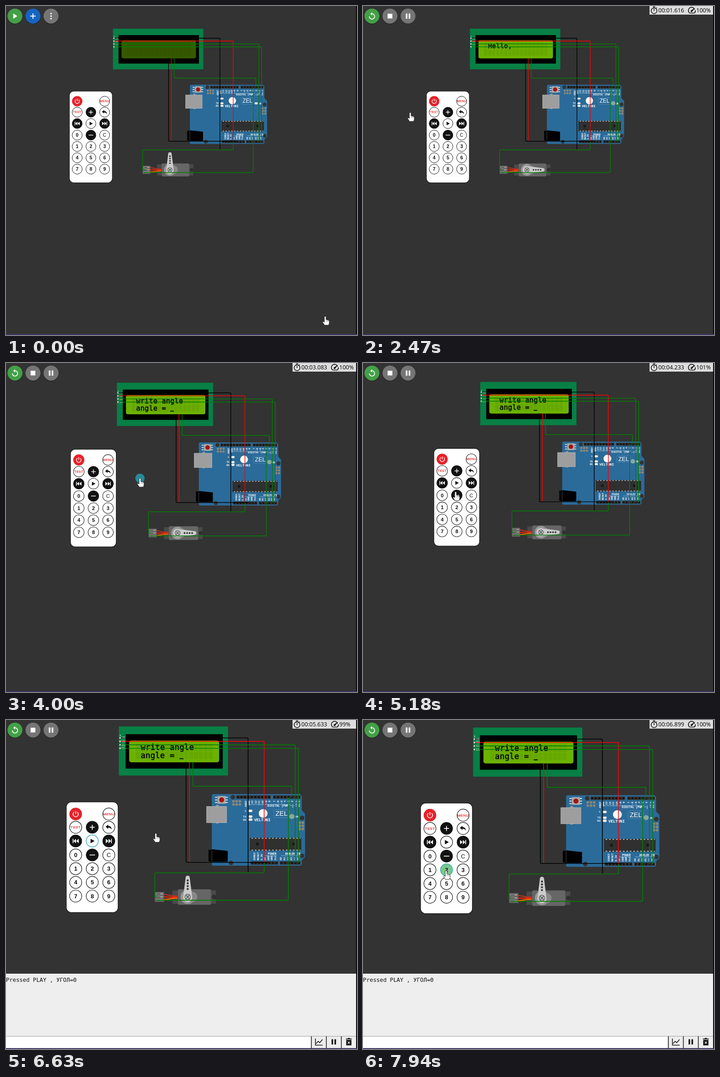
An HTML page for the animation above (8000 ms loop, 773 px wide and 725 px high).

```html
<!DOCTYPE html>
<html lang="en">
<head>
<meta charset="utf-8">
<title>Remote controlled servo simulation</title>
<style>
  html, body { margin: 0; width: 100%; height: 100%; overflow: hidden; background: #333; }
  svg { display: block; width: 100vw; height: 100vh; }
  text { white-space: pre; }
  .sans { font-family: "Liberation Sans", Arial, sans-serif; }
  .ui { font-family: "Open Sans", "Noto Sans", sans-serif; }
  .mono { font-family: "DejaVu Sans Mono", monospace; }
  .silk { font-family: "Liberation Mono", monospace; font-weight: bold; fill: #fff; }
</style>
</head>
<body>
<svg id="stage" viewBox="0 0 773 725" preserveAspectRatio="none"></svg>
<script>
const rect = (x, y, w, h, fill, extra = '') =>
  `<rect x="${x}" y="${y}" width="${w}" height="${h}" fill="${fill}" ${extra}/>`;
const circle = (x, y, r, fill, extra = '') => `<circle cx="${x}" cy="${y}" r="${r}" fill="${fill}" ${extra}/>`;
const path = (d, fill, extra = '') => `<path d="${d}" fill="${fill}" ${extra}/>`;
const line = (d, color, width = 1, extra = '') =>
  path(d, 'none', `stroke="${color}" stroke-width="${width}" ${extra}`);
const text = (x, y, size, cls, str, extra = '') =>
  `<text x="${x}" y="${y}" font-size="${size}" class="${cls}" ${extra}>${str}</text>`;
const group = (id, content, extra = '') => `<g id="${id}" ${extra}>${content}</g>`;
const repeat = (n, draw) => Array.from({ length: n }, (_, i) => draw(i)).join('');
const MID = 'text-anchor="middle"';

const MM = 2.4875, LCD_X = 235.5, LCD_Y = 50, CELL = 3.55 * MM, ROW = 5.95 * MM;
const TEXT_X = LCD_X + 12.45 * MM, TEXT_Y = LCD_Y + 12.5 * MM;

function lcd() {
  const row = (y, str) => text(TEXT_X + CELL, y + 11.6, 14.67, 'mono', str, 'stroke="#000" stroke-width=".35"');
  const lines = (id, top, bottom) => group(id, row(TEXT_Y, top) + row(TEXT_Y + ROW, bottom) +
    (bottom ? rect(TEXT_X + 9 * CELL, TEXT_Y + ROW + 12.2, 7.4, 1.6, '#000') : ''));
  const pins = ['GND', 'VCC', 'SDA', 'SCL'];
  return rect(LCD_X, LCD_Y, 80 * MM, 36 * MM, '#087f45') +
    rect(LCD_X + 4.95 * MM, LCD_Y + 5.7 * MM, 71.2 * MM, 25.2 * MM, '#000') +
    rect(LCD_X + 7.55 * MM, LCD_Y + 10.3 * MM, 66 * MM, 16 * MM, '#365900', 'id="screen" rx="3.8"') +
    repeat(32, i => rect(TEXT_X + i % 16 * CELL, TEXT_Y + (i >> 4) * ROW, 7.34, 13.8, '#000', 'opacity=".06"')) +
    lines('hello', 'Hello,', '') + lines('prompt', 'write angle', 'angle =') +
    text(237, 68, 4, 'silk', '1') +
    pins.map((p, i) => circle(237.8, 71 + i * 6.3, 1.5, '#ddd') +
      text(240.5, 72.5 + i * 6.3, 4, 'silk', p)).join('');
}

function board() {
  const up = (x, y, label, anchor) => text(0, 0, 5, 'silk', label,
    `text-anchor="${anchor}" transform="translate(${x + 1.6} ${y}) rotate(-90)"`);
  const header = (x, y, n) => rect(x, y, n * 6.3, 6.2, '#333') +
    repeat(n, i => rect(x + 1.7 + i * 6.3, y + 1.6, 3, 3, '#0c0c0c'));
  const dots = (x, y, cols, rows) => repeat(cols * rows,
    i => circle(x + i % cols * 5.8, y + Math.floor(i / cols) * 5.8, 2.4, '#8c8677'));
  const digital = 'AREF GND 13 12 ~11 ~10 ~9 8'.split(' ');
  const digital2 = '7 ~6 ~5 4 ~3 2 TX→1 RX←0'.split(' ');
  const power = 'IOREF RESET 3.3V 5V GND GND Vin'.split(' ');
  const led = (x, y) => rect(x, y, 7, 4, '#ddd', 'rx="1"') + rect(x + 1.8, y, 3.4, 4, '#fff');
  return path('M405 177q0-3.5 3.5-3.5H566l3 3.5v26l6 6v79l-6 6v8l-3 2H408q-3 0-3-3Z', '#2b6b99') +
    [[443.5, 179], [569.5, 217], [569.5, 286], [440, 299]].map(p => circle(...p, 4.2, '#333')).join('') +
    path('M411 197q4-9 8 0v28q-4 5-8 0z', '#8d9499') +
    rect(395.5, 196, 36.5, 29.5, '#9e9e9e', 'stroke="#b8b8b8" stroke-width=".8"') +
    path('M399 275h6v-1l29 3v20h-29l-6-1z', '#000') + rect(404, 276, 2, 20, '#222') +
    repeat(6, i => rect(i % 2 ? 430 : 411, 178.5 + (i >> 1) * 4.7, 4, 1.8, '#ddd')) +
    rect(415.5, 177, 15, 14, '#aaa', 'rx="1"') + circle(423, 184, 4.6, '#a5140f') +
    dots(444.5, 186.5, 3, 2) + dots(565.2, 225.5, 2, 3) +
    header(449.5, 175.8, 10) + header(516.5, 175.8, 8) +
    header(475.5, 296, 8) + header(529, 296, 6) +
    digital.map((p, i) => up(466.5 + i * 6.3 - (i > 1 ? .5 : 0), 185, p, 'end')).join('') +
    digital2.map((p, i) => up(519 + i * 6.45, 185, p, 'end')).join('') +
    power.map((p, i) => up(483 + i * 6.3, 294.5, p, 'start')).join('') +
    repeat(6, i => up(531 + i * 6.3, 294.5, 'A' + i, 'start')) +
    text(530.5, 196.5, 5.3, 'silk', 'DIGITAL (PWM ~)', MID) + line('M472 192.5h76', '#dfe9ef', .5) +
    text(515, 284.5, 5.2, 'silk', 'POWER', MID) + text(552.5, 284.5, 5.2, 'silk', 'ANALOG IN', MID) +
    line('M501 286h22M531 286h36', '#dfe9ef', .5) +
    circle(498.5, 208.7, 8, '#fff') + text(497, 223, 7.1, 'silk', 'VELTONI', MID) +
    rect(518, 202, 28, 14.5, 'none', 'rx="2" stroke="#5f93b8" stroke-width=".6"') +
    text(532, 213.3, 12, 'sans', 'ZEL', MID + ' fill="#fff"') +
    text(465, 205.3, 5, 'silk', 'L') + text(462, 216, 5, 'silk', 'TX') + text(462, 222, 5, 'silk', 'RX') +
    led(472, 202) + led(472, 212.5) + led(472, 218) + led(547.5, 212.5) + text(557, 216.5, 5, 'silk', 'ON') +
    circle(551, 214.3, 4.6, '#86a99f', 'id="power-led"') +
    rect(475, 253.5, 92.5, 22.5, '#303030', 'stroke="#222"') +
    line('M477 254h90M477 275.5h90', '#bbb', 1.4, 'stroke-dasharray="3.2 3.1"') +
    circle(488, 264.5, 2.8, '#191919') + circle(554, 264.5, 2.8, '#191919');
}

function servo() {
  const leads = ['#b32', '#f20', '#f60'].map((c, i) =>
    line(`M317 ${356 + i * 5}C326 ${357 + i * 4.4} 328 ${359.5 + i * 2} 342 ${359.2 + i * 2}`, c, 1.9)).join('');
  return rect(301, 352, 17, 18, '#666') +
    repeat(3, i => rect(303, 354 + i * 5.5, 13, 2.6, '#999') + rect(304, 355 + i * 5.5, 7, 1, '#333')) +
    rect(333, 349, 79.5, 24.5, '#4a4a4a') + circle(409, 361, 4.2, '#303030') + leads +
    rect(343, 347, 60.5, 28.5, '#666', 'rx="3"') +
    circle(361, 361, 13, '#999') + circle(369, 361, 9.5, '#888') +
    group('horn', path('M-8.3 1a8.3 8.3 0 0 0 16.6 0L3.8-35a3.8 3.8 0 0 0-7.6 0Z', '#ccc') +
      repeat(4, i => circle(0, -14.5 - i * 5.2, 1.8, '#303030'))) +
    circle(361, 361, 5.2, '#bbb', 'stroke="#555" stroke-width="1"') +
    line('M357.5 357.5l7 7m0-7l-7 7', '#555', 1.2);
}

const COLS = [156.8, 187, 217.2], ROWS = [209.8, 234, 259, 284.5, 309.5, 334.5, 359.5];
function remote() {
  const key = (c, r, face, fill = '#fff', id = '') =>
    `<g transform="translate(${COLS[c]} ${ROWS[r]})">` +
    circle(0, 0, 11, fill, `stroke="${fill === '#fff' ? '#111' : fill}" stroke-width="1" ${id && `id="${id}"`}`) + face + '</g>';
  const digit = s => text(0, 3.8, 10.6, 'sans', s, MID + ' font-weight="bold" fill="#111"');
  const word = s => text(0, 2.4, 6.6, 'sans', s, MID + ' fill="#d22" stroke="#d22" stroke-width=".2" letter-spacing=".4"');
  const skip = 'M-5.5-4h1.4v8h-1.4zM.5-4v8l-4.5-4zM5.5-4v8L1-0z';
  const black = '#121212';
  return rect(139.6, 187.6, 94.6, 202, '#fff', 'rx="9.5" stroke="#1f1f1f" stroke-width="1.3"') +
    key(0, 0, line('M-3-3.6a4.8 4.8 0 1 0 6 0M0-5.5V0', '#fff', 1.3), '#e62129') +
    key(2, 0, word('MENU')) + key(0, 1, word('TEST')) +
    key(1, 1, line('M-4.5 0h9M0-4.5v9', '#fff', 1.4), black) +
    key(2, 1, path('M-6-1l5-4v2.6q6 0 6.2 6.6q-2-3.8-6.2-3.8v2.6z', '#111')) +
    key(0, 2, path(skip, '#fff'), black) +
    key(1, 2, path('M-3-4l7.2 4l-7.2 4z', '#111'), '#fff', 'key-play') +
    key(2, 2, path(skip, '#fff', 'transform="scale(-1 1)"'), black) +
    key(0, 3, digit('0')) + key(1, 3, line('M-5 0h10', '#fff', 1.4), black) +
    key(2, 3, text(0, 3.8, 10.6, 'sans', 'C', MID + ' fill="#111"')) +
    repeat(9, i => key(i % 3, 4 + Math.floor(i / 3), digit(i + 1), '#fff', 'key-' + (i + 1)));
}

const wires = () => [
  ['M239 71H469.2q2 0 2 2V316', '#000'],
  ['M239 77.2H498.4q2 0 2 2V299', '#f00'],
  ['M239 83.5H555q2 0 2 2V299', 'green'],
  ['M239 90H561q2 0 2 2V299', 'green'],
  ['M364 115V297', '#f00'],
  ['M358 115V296q0 2 2 2H508', '#000'],
  ['M370.5 115V157q0 2 2 2H548.5q2 0 2 2V179', 'green'],
  ['M306 361H301V319q0-2 2-2H498.4q2 0 2-2V299', 'green'],
  ['M303 367H542.5q2 0 2-2V179', 'green'],
].map(([d, color]) => line(d, color, 1.35)).join('');

function toolbar() {
  const disc = (x, color) => circle(x, 23.5, 16.8, '#000', 'opacity=".22"') + circle(x, 22.2, 16.5, color);
  return group('idle-bar', disc(19.7, '#43a047') + path('M16 16.5v11.6l9-5.8z', '#fff') +
      disc(59.4, '#1565c0') + line('M53.4 22.2h12M59.4 16.2v12', '#fff', 2) +
      disc(99.2, '#757575') + repeat(3, i => circle(99.2, 16.8 + i * 5.5, 1.7, '#fff'))) +
    group('run-bar', disc(19.7, '#43a047') + line('M14 23a5.8 5.8 0 1 0 5.8-5.8', '#fff', 1.8) +
      path('M20 13.4v7.6l-4-3.8z', '#fff') +
      disc(59.4, '#757575') + rect(54.2, 17, 10.4, 10.4, '#fff') +
      disc(99.2, '#757575') + rect(94.3, 16.5, 3.5, 11.5, '#fff') + rect(100.6, 16.5, 3.5, 11.5, '#fff'));
}

const meter = () => group('meter', rect(631, 0, 140, 19, '#ddd') +
  circle(641, 10.5, 6.4, 'none', 'stroke="#111" stroke-width="1.6"') +
  line('M638.5 1.8h5M641 6.5v4.5M645.5 5l1.5-1.5', '#111', 1.6) +
  text(650.5, 14, 12.5, 'ui', '', 'id="clock"') +
  line('M719.3 15.5a7 7 0 1 1 11-7.5M732 9.5a7 7 0 0 1-2.2 6H719.5', '#111', 1.6) +
  path('M731 4l-6 8.5a1.8 1.8 0 0 1-3-2.6z', '#111') +
  text(734, 14, 12.5, 'ui', '', 'id="speed"'));

const serial = () => group('serial', rect(0, 559, 771, 164, '#eee') +
  text(0, 577.3, 12.3, 'mono', 'Pressed PLAY , УГОЛ=0', 'fill="#111"') +
  rect(0, 697, 671, 26, '#fff') + line('M0 697h771', '#999', 1) +
  line('M672.5 697V723M705.5 697V723M738.5 697V723', '#111', 1.5) +
  line('M681.5 702v14.5h16M683 713l4.5-5 3.5 3 6-7', '#111', 1.6) +
  rect(717, 703.5, 3.4, 11.5, '#111') + rect(723.4, 703.5, 3.4, 11.5, '#111') +
  path('M748.5 702h3.5l1-1.2h4l1 1.2h3.5v1.8h-13zM749.3 705h11.4v12h-11.4z', '#111') +
  line('M752.8 708.8l4.4 4.4m0-4.4l-4.4 4.4', '#eee', 1.3));

const hand = 'M-1.9 1.6a1.9 1.9 0 0 1 3.8 0V7l5 1.3q2.1.6 2.1 2.6v2.6q0 2-1.5 5.7H-1.8q-.9-2.4-3.2-5.2-1.3-1.9.2-2.6t2.9 1.5Z';

document.getElementById('stage').innerHTML = rect(0, 0, 773, 725, '#333') +
  group('scene', lcd() + board() + servo() + remote() + wires()) +
  toolbar() + meter() + serial() +
  rect(771, 0, 2, 725, '#080808') + rect(0, 723.3, 773, 1.7, '#3d3672') +
  circle(0, 0, 10.3, '#258a9b', 'id="grab"') +
  group('pointer', path(hand, '#fff', 'stroke="#222" stroke-width=".9"') +
    line('M2.2 8v4M4.6 8.6v3.6M6.8 9.4v3', '#555', .6));

const LOOP = 8000, RUN = 880, LIGHT = 1900, PROMPT = 3000, PRESS_PLAY = 5480, PRESS_TWO = 7800;
const DRAGS = [[3420, 4450], [6750, 7050]];
const ACTIONS = [
  { zoom: 3100 }, { drag: DRAGS[0] }, { zoom: 6150 }, { zoom: 6300 }, { drag: DRAGS[1] },
];
const POINTER = [
  [70, 703, 684], [780, 19, 19], [950, 20, 20], [1350, 79, 214], [1700, 94, 228], [2020, 101, 245],
  [2470, 104, 235], [2600, 104, 235], [3050, 282, 248], [3420, 283.3, 247.7], [4000, 295, 254],
  [4450, 309, 252.3], [4550, 309, 252.3], [5180, 204, 284], [5380, 206, 262], [5540, 206, 262],
  [5980, 330, 247], [6350, 330, 247], [6630, 330, 250], [6750, 330, 250], [7050, 324, 252.5],
  [7180, 324, 252.5], [7720, 183, 332],
];
const CLOCK = [[RUN, 4], [1350, 32], [2470, 97], [4000, 185], [5180, 254], [6630, 338], [7940, 414], [8000, 417]];
const SPEED = [[0, 0], [1880, 98], [2130, 100], [4600, 101], [5400, 99], [7000, 100], [7560, 101], [7800, 100]];

function track(keys, t, column, ease = u => u * u * (3 - 2 * u)) {
  const i = keys.findIndex(k => k[0] > t);
  if (i < 0) return keys[keys.length - 1][column];
  if (i === 0) return keys[0][column];
  const a = keys[i - 1], b = keys[i];
  return a[column] + (b[column] - a[column]) * ease((t - a[0]) / (b[0] - a[0]));
}
const pointerAt = t => [track(POINTER, t, 1), track(POINTER, t, 2)];

// Wheel notches scale about the pointer; drags carry the scene along with it.
function viewAt(t) {
  let scale = 1, x = 0, y = 0;
  for (const { zoom, drag } of ACTIONS) {
    if (t < (zoom ?? drag[0])) break;
    if (zoom) {
      const [px, py] = pointerAt(zoom), f = 1.065;
      scale *= f;
      x = px + (x - px) * f;
      y = py + (y - py) * f;
    } else {
      const a = pointerAt(drag[0]), b = pointerAt(Math.min(t, drag[1]));
      x += b[0] - a[0];
      y += b[1] - a[1];
    }
  }
  return `translate(${x} ${y}) scale(${scale})`;
}

const el = Object.fromEntries([...document.querySelectorAll('[id]')].map(e => [e.id, e]));
const show = (id, on) => el[id].setAttribute('display', on ? 'inline' : 'none');
const set = (id, attr, value) => el[id].setAttribute(attr, value);

function render(t) {
  const running = t >= RUN, [px, py] = pointerAt(t);
  set('scene', 'transform', viewAt(t));
  set('pointer', 'transform', `translate(${px} ${py})`);
  set('grab', 'transform', `translate(${px} ${py})`);
  show('grab', DRAGS.some(([from, to]) => t >= from && t < to));

  show('idle-bar', !running);
  show('run-bar', running);
  show('meter', running);
  show('power-led', running);
  const ms = Math.max(0, Math.floor(Math.round(track(CLOCK, t, 1, u => u)) * 1000 / 60 - .1));
  el.clock.textContent = '00:' + (ms / 1000).toFixed(3).padStart(6, '0');
  el.speed.textContent = SPEED.filter(k => k[0] <= t).pop()[1] + '%';

  set('screen', 'fill', t < LIGHT ? '#365900' : '#6cb201');
  show('hello', t >= LIGHT && t < PROMPT);
  show('prompt', t >= PROMPT);
  show('serial', t >= PRESS_PLAY);
  const angle = track([[960, 0], [1030, 90], [PRESS_PLAY, 90], [PRESS_PLAY + 90, 0]], t, 1);
  set('horn', 'transform', `translate(361 361) rotate(${angle})`);

  const playFocus = t >= PRESS_PLAY - 60 && t < PRESS_TWO, twoDown = t >= PRESS_TWO;
  set('key-play', 'stroke', playFocus ? '#1a9db8' : '#111');
  set('key-play', 'fill', playFocus && t < PRESS_PLAY + 60 ? '#7cc68d' : '#fff');
  set('key-2', 'stroke', twoDown ? '#1aa9b8' : '#111');
  set('key-2', 'fill', twoDown ? '#7cc68d' : '#fff');
}

const start = performance.now();
(function frame() {
  render((performance.now() - start) % LOOP);
  requestAnimationFrame(frame);
})();
</script>
</body>
</html>
```
